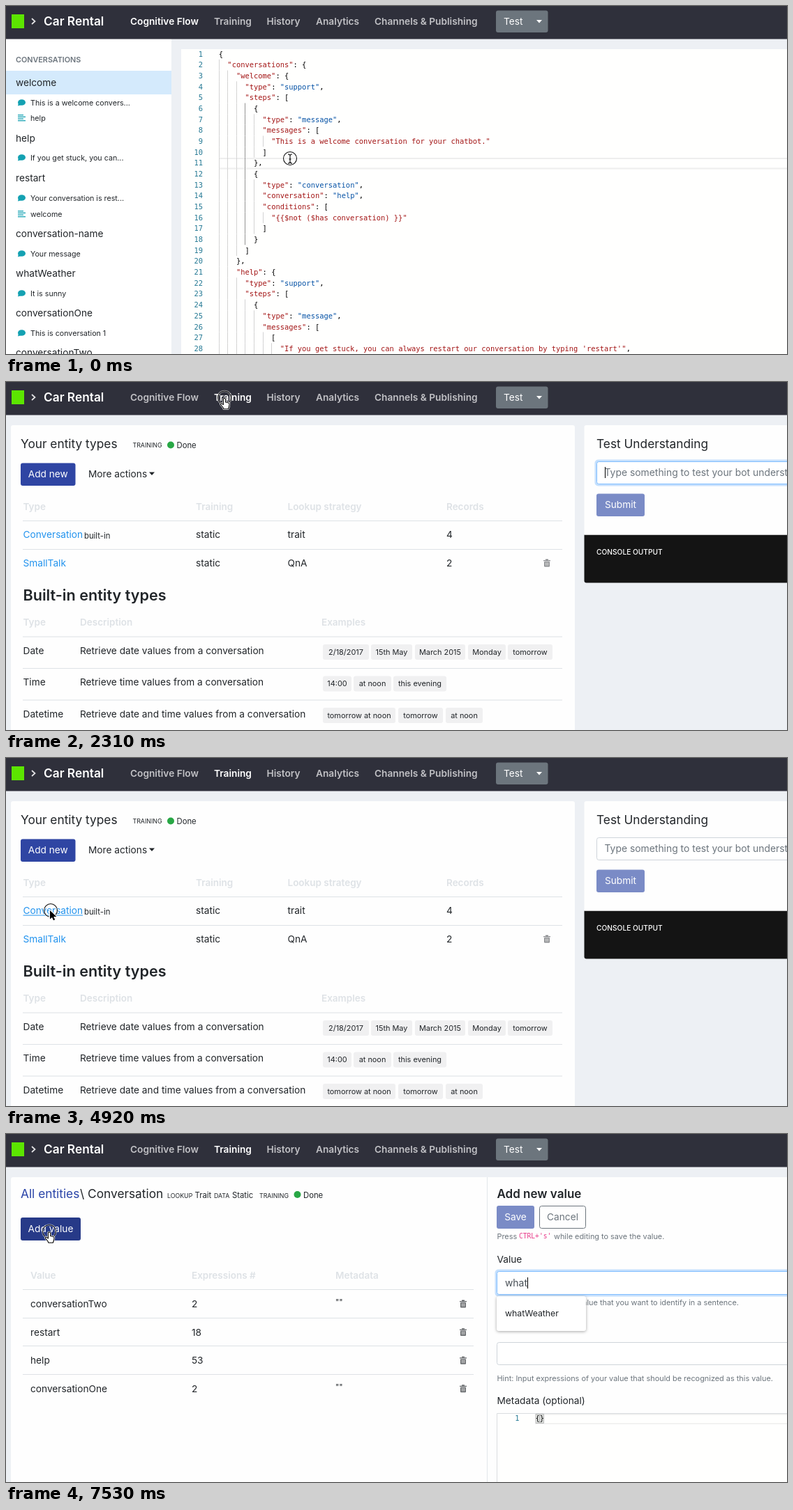
Write an HTML page with a canvas that moves like this. It is 1119 by 500 pixels and loops after 8 s.

```html
<!DOCTYPE html>
<html lang="en">
<head>
<meta charset="utf-8">
<title>Bot training console</title>
<style>
html, body { margin: 0; width: 1119px; height: 500px; overflow: hidden; background: #edf0f4; }
canvas { display: block; }
</style>
</head>
<body>
<canvas id="stage" width="1119" height="500"></canvas>
<script>
const g = document.getElementById('stage').getContext('2d');
const LOOP = 8000;
const SANS = 'Inter, Roboto, sans-serif';
const MONO = '"DejaVu Sans Mono", monospace';
const INK = '#212529', MUTED = '#6c757d', FAINT = '#dee2e6', BLUE = '#2f45a3', DARK_BLUE = '#273a88';
const PALE_BLUE = '#7a8bc6', LINK = '#2293ee', TEAL = '#14a1b2', GREEN = '#28a745', WHITE = '#fefefe';

// Times of the page and panel changes
const TRAINING = 2310, BLUR = 4490, LOADING = 4920, ENTITY = 5010, PRESS = 6200, FORM = 6290;

// cy is the middle of the capital letters
function text(s, x, cy, o = {}) {
  const size = o.size || 13.7;
  g.font = `${o.weight || 400} ${size}px ${o.font || SANS}`;
  g.textAlign = o.align || 'left';
  g.fillStyle = o.color || INK;
  g.fillText(s, x, cy + size * 0.36);
}

function box(x, y, w, h, fill, r = 0, stroke) {
  g.beginPath();
  g.roundRect(x, y, w, h, r);
  if (fill) { g.fillStyle = fill; g.fill(); }
  if (stroke) { g.strokeStyle = stroke; g.lineWidth = 1; g.stroke(); }
}

function disc(x, y, r, fill) {
  g.beginPath();
  g.arc(x, y, r, 0, 7);
  g.fillStyle = fill;
  g.fill();
}

function rule(x1, x2, y) { box(x1, y, x2 - x1, 1, FAINT); }

function triangle(x, y, color) {
  g.fillStyle = color;
  g.beginPath();
  g.moveTo(x - 4, y - 2);
  g.lineTo(x + 4, y - 2);
  g.lineTo(x, y + 2.5);
  g.fill();
}

function button(label, x, y, w, h, fill) {
  box(x, y, w, h, fill, 3);
  text(label, x + w / 2, y + h / 2 - 0.5, { color: '#fff', align: 'center' });
}

function trash(x, y, color) {
  box(x - 5, y - 4, 10, 1.3, color);
  box(x - 2, y - 5.5, 4, 1.5, color);
  box(x - 4, y - 2, 8, 7.5, color, 1);
  for (const dx of [-2.3, -0.4, 1.5]) box(x + dx, y - 1, 0.9, 5, '#e4e4e4');
}

function field(x, y, h, focused) {
  if (focused) box(x - 2.5, y - 2.5, 500, h + 5, '#c5e0fd', 5);
  box(x + 0.5, y + 0.5, 500, h - 1, '#fff', 3, focused ? '#80bdff' : '#ced4da');
}

function header(t) {
  box(0, 0, 1119, 47.6, '#2f303b');
  box(8, 12, 18, 20, '#5ce500');
  g.strokeStyle = '#e4e4e6';
  g.lineWidth = 1.7;
  g.beginPath();
  g.moveTo(37, 18);
  g.lineTo(41.5, 22);
  g.lineTo(37, 26);
  g.stroke();
  text('Car Rental', 54, 22, { size: 17.3, weight: 600, color: '#fff' });
  const active = t < TRAINING ? 0 : 1;
  const hover = t > 1750 && t < TRAINING ? 1 : active;
  [['Cognitive Flow', 178], ['Training', 298], ['History', 373.5], ['Analytics', 444], ['Channels & Publishing', 528]]
    .forEach(([s, x], i) => text(s, x, 22, {
      size: 13.7, weight: 600, color: i === active || i === hover ? '#fff' : '#c1c1c5'
    }));
  box(702, 6.5, 74.5, 31.5, '#6c757d', 3);
  text('Test', 713, 22, { color: '#fff' });
  triangle(764, 22, '#fff');
}

// Rows: kind (h = heading, m = message, l = link), label, y
const TREE = [
  ['h', 'welcome', 110], ['m', 'This is a welcome convers...', 139], ['l', 'help', 161],
  ['h', 'help', 190], ['m', 'If you get stuck, you can...', 218],
  ['h', 'restart', 247], ['m', 'Your conversation is rest...', 276], ['l', 'welcome', 299],
  ['h', 'conversation-name', 327], ['m', 'Your message', 356],
  ['h', 'whatWeather', 384], ['m', 'It is sunny', 413],
  ['h', 'conversationOne', 441], ['m', 'This is conversation 1', 470],
  ['h', 'conversationTwo', 498]
];

function bubble(x, y) {
  g.fillStyle = TEAL;
  g.beginPath();
  g.ellipse(x, y - 0.5, 5.5, 4.3, 0, 0, 7);
  g.fill();
  g.beginPath();
  g.moveTo(x - 4.5, y);
  g.lineTo(x - 5.5, y + 4.6);
  g.lineTo(x, y + 3);
  g.fill();
}

function sidebar() {
  box(0, 47, 237, 453, '#fff');
  text('CONVERSATIONS', 14, 77, { size: 10.8, weight: 600, color: MUTED });
  box(0, 93, 237, 34, '#d4eafc');
  for (const [kind, label, y] of TREE) {
    if (kind === 'h') { text(label, 14, y); continue; }
    text(label, 35, y, { size: 10.7 });
    if (kind === 'm') bubble(22.5, y);
    else [8, 11, 8, 11].forEach((w, i) => box(17, y - 5 + i * 2.7, w, 1.3, TEAL));
  }
}

const CODE = `{
  "conversations": {
    "welcome": {
      "type": "support",
      "steps": [
        {
          "type": "message",
          "messages": [
            "This is a welcome conversation for your chatbot."
          ]
        },
        {
          "type": "conversation",
          "conversation": "help",
          "conditions": [
            "{{$not ($has conversation) }}"
          ]
        }
      ]
    },
    "help": {
      "type": "support",
      "steps": [
        {
          "type": "message",
          "messages": [
            [
              "If you get stuck, you can always restart our conversation by typing 'restart'",`.split('\n');

const CHAR = 6.28, LINE = 15.67, LEFT = 304.8;

function codeLine(s, cy) {
  let col = 0;
  for (const part of s.split(/("[^"]*")/)) {
    const value = s.slice(0, col).endsWith(': ');
    const color = part[0] !== '"' ? '#000' : value ? '#0451a5' : '#a31515';
    text(part, LEFT + col * CHAR, cy, { size: 10.43, font: MONO, color });
    col += part.length;
  }
}

function editor(t) {
  box(251, 62, 868, 438, '#fffffe');
  box(305, 218, 814, 2, '#eeeeee');
  box(305, 232.5, 814, 2, '#eeeeee');
  CODE.forEach((s, i) => {
    const cy = 69 + i * LINE;
    const depth = s.search(/\S/) / 2;
    for (let d = 0; d < depth; d++) {
      const lit = d === 3 && i > 4 && i < 18;
      box(Math.round(LEFT + d * 2 * CHAR), cy - LINE / 2, 1, LINE, lit ? '#939393' : '#d3d3d3');
    }
    text(i + 1, 282, cy, { size: 10.43, font: MONO, color: '#237893', align: 'right' });
    codeLine(s, cy);
  });
  if ((t + 600) % 1000 < 500) box(368, 219, 1.5, 15, '#000');
}

function heads(list, y) {
  for (const [s, x] of list) text(s, x, y, { size: 13.5, weight: 600, color: FAINT });
}

function chips(y, list) {
  for (const [s, x1, x2] of list) {
    box(x1, y - 11, x2 - x1, 22, '#f0f0f1', 3);
    text(s, (x1 + x2) / 2, y, { size: 10.9, align: 'center' });
  }
}

function trainingPage(t) {
  box(7, 62, 808, 445, WHITE, 3);
  text('Your entity types', 21, 89, { size: 17.3 });
  text('TRAINING', 181.5, 91, { size: 8.8 });
  disc(236, 90.5, 5, GREEN);
  text('Done', 244.5, 91, { size: 11.3 });
  const over = t > 3600 && t < 4050;
  button('Add new', 21, 116.5, 78.5, 32.5, over ? '#2a3e96' : BLUE);
  text('More actions', 118, 132.5);
  triangle(209, 131.5, INK);

  heads([['Type', 24.5], ['Training', 272], ['Lookup strategy', 403.5], ['Records', 631]], 179);
  rule(24, 797, 199);
  rule(24, 797, 240);
  text('Conversation', 24.5, 219.5, { color: LINK });
  if (t > 4400) box(24.5, 225.5, 85.5, 1, LINK);
  text('built-in', 112, 220.5, { size: 11.3 });
  text('SmallTalk', 24.5, 260, { color: LINK });
  [['static', 'trait', '4', 219.5], ['static', 'QnA', '2', 260]].forEach(([a, b, c, y]) => {
    text(a, 272, y);
    text(b, 403.5, y);
    text(c, 631, y);
  });
  trash(775, 260, '#8c8e91');

  text('Built-in entity types', 24.5, 306.5, { size: 21.6, weight: 600 });
  heads([['Type', 24.5], ['Description', 106], ['Examples', 452]], 345);
  [['Date', 'date', 386], ['Time', 'time', 431.5], ['Datetime', 'date and time', 477]].forEach(([name, what, y]) => {
    rule(24, 797, y - 20.5);
    text(name, 24.5, y);
    text(`Retrieve ${what} values from a conversation`, 106, y);
  });
  chips(388, [['2/18/2017', 454, 520], ['15th May', 523, 582], ['March 2015', 586, 658], ['Monday', 662, 716], ['tomorrow', 719, 783]]);
  chips(433.5, [['14:00', 454, 495], ['at noon', 498, 552], ['this evening', 555, 631]]);
  chips(479, [['tomorrow at noon', 454, 558], ['tomorrow', 562, 626], ['at noon', 630, 683]]);

  const focused = t < BLUR;
  box(828.5, 219.5, 300, 69, '#141414', [0, 0, 0, 3]);
  box(828.5, 62, 300, 157.5, WHITE, [3, 0, 0, 0]);
  text('Test Understanding', 846, 89, { size: 17.3 });
  field(846, 114, 33, focused);
  text('Type something to test your bot understanding', 857.5, 130, { size: 13.9, color: MUTED });
  if (focused && (t - 2200) % 1000 < 500) box(858, 122, 1, 16, '#000');
  button('Submit', 846, 160.5, 69, 32.5, PALE_BLUE);
  text('CONSOLE OUTPUT', 846, 244.5, { size: 10.2, weight: 500, color: '#fff' });
}

function entityPage(t) {
  box(7, 62, 1119, 445, WHITE, 3);
  box(689, 62, 1, 438, '#e3e7eb');
  text('All entities', 21, 86, { size: 17.3, color: '#2a44a8' });
  text('\\ Conversation', 106, 86, { size: 17.3 });
  [['LOOKUP', 231], ['DATA', 298], ['TRAINING', 363]].forEach(([s, x]) => text(s, x, 88.5, { size: 8.8 }));
  [['Trait', 270.5], ['Static', 324], ['Done', 426]].forEach(([s, x]) => text(s, x, 88, { size: 11.3 }));
  disc(417.5, 87, 5, GREEN);

  if (t >= PRESS && t < 6490) box(19.5, 118.5, 89, 36, '#c8cfe8', 4);
  button('Add value', 21, 120, 86, 33, t > 5850 ? DARK_BLUE : BLUE);

  heads([['Value', 35], ['Expressions #', 266], ['Metadata', 472]], 203);
  [['conversationTwo', 2, '""'], ['restart', 18, ''], ['help', 53, ''], ['conversationOne', 2, '""']].forEach(([s, n, meta], i) => {
    const y = 244 + i * 40.6;
    rule(24, 670, Math.round(y - 21));
    text(s, 35, y);
    text(n, 266, y);
    text(meta, 472, y - 2, { size: 11.3 });
    trash(655, y, '#66696c');
  });

  if (t >= FORM) return form(t);
  text('4 items', 711, 95.5, { size: 21.2, weight: 600 });
  text('Select an item to view details.', 711, 124);
}

function form(t) {
  const hint = { size: 10.9, color: MUTED };
  text('Add new value', 703.5, 86, { size: 17, weight: 600 });
  button('Save', 703, 103, 54, 33, PALE_BLUE);
  box(764.5, 103.5, 66, 32, null, 3, MUTED);
  text('Cancel', 797.5, 119, { color: MUTED, align: 'center' });
  text('Press', 703.5, 147, hint);
  text("CTRL+'s'", 735, 147, { size: 9.6, font: MONO, color: '#e83e8c' });
  text('while editing to save the value.', 785, 147, hint);

  text('Value', 703.5, 180);
  text('Hint: Input the unique value that you want to identify in a sentence.', 1050, 242, { ...hint, align: 'right' });
  text('Expressions', 703.5, 272);
  field(703, 299, 33, false);
  text('Hint: Input expressions of your value that should be recognized as this value.', 703.5, 351, hint);
  text('Metadata (optional)', 703.5, 383);

  box(703.5, 401.5, 500, 120, '#fffffe', 0, '#dadde0');
  box(758, 402, 361, 1.5, '#eeeeee');
  box(758, 415.5, 361, 1.5, '#eeeeee');
  for (const i of [0, 1]) box(759 + i * 6, 402.5, 5.5, 13, '#e2e5e2', 0, '#b9b9b9');
  text('1', 732.5, 408.5, { size: 10.43, font: MONO, color: '#237893', align: 'center' });
  text('{}', 758.5, 408.5, { size: 10.43, font: MONO, color: '#000' });

  // Typing and its suggestions
  const typed = 'what'.slice(0, [7210, 7360, 7445, 7530].filter(at => t >= at).length);
  field(703, 197, 34, true);
  text(typed, 715, 214, { size: 13.9, color: '#495057' });
  const width = g.measureText(typed).width;
  if (typed || t < 6850) box(Math.round(715 + width), 206, 1, 16, '#000');
  if (!typed) return;
  const words = ['welcome', 'whatWeather'].filter(w => w.startsWith(typed));
  g.save();
  g.shadowColor = 'rgba(0,0,0,.35)';
  g.shadowBlur = 4;
  g.shadowOffsetY = 1;
  box(703, 233, 128, 13 + 37 * words.length, '#fff', 3);
  g.restore();
  words.forEach((w, i) => text(w, 715, 258 + i * 37, { size: 12.3 }));
}

const HAND = new Path2D('M-1.6 2.5a1.6 1.6 0 0 1 3.2 0v4l3.6 .7q2 .4 1.8 2.4l-.5 3.4-1.2 3.2h-6.4l-1-2.2-3.6-4.4q0-1.7 1.8-1.2l2.3 1.6z');
const ARROW = new Path2D('M-1 0v12.6l3-2.7 2 4.4 2.2-1-2-4.3h4.2z');
const BEAM = new Path2D('M-3 -6q3 0 3 2q0 -2 3 -2M0 -4v9M-3 7q3 0 3 -2q0 2 3 2M-1.5 1h3');

const PATH = [
  [0, 407, 219], [900, 407, 219], [1900, 313, 22.5], [3130, 313, 22.5], [3720, 91.5, 148],
  [3930, 91, 149], [4570, 64, 219], [5600, 64, 219], [6030, 62, 140], [LOOP, 62, 140]
];

function pointer(t) {
  const i = PATH.findIndex(p => p[0] > t);
  const [t0, x0, y0] = PATH[i - 1], [t1, x1, y1] = PATH[i];
  const u = (t - t0) / (t1 - t0), k = u * u * (3 - 2 * u);
  return [x0 + (x1 - x0) * k, y0 + (y1 - y0) * k];
}

function shape(t, x, y) {
  if (t < TRAINING && y > 62) return BEAM;
  if (y < 36) return x > 296 && x < 354 ? HAND : ARROW;
  if (t >= ENTITY) return y < 153 ? HAND : ARROW;
  if (t >= LOADING) return ARROW;
  const onButton = x < 100 && y > 116 && y < 151;
  const onLink = x < 110 && y > 209;
  return onButton || onLink ? HAND : ARROW;
}

function cursor(t) {
  const [x, y] = pointer(t);
  const path = shape(t, x, y);
  g.save();
  g.translate(x, y);
  g.lineJoin = 'round';
  g.beginPath();
  g.arc(0, 0, 9.5, 0, 7);
  g.strokeStyle = 'rgba(255,255,255,.55)';
  g.lineWidth = 2.6;
  g.stroke();
  g.strokeStyle = '#111';
  g.lineWidth = 1.1;
  g.stroke();
  if (path !== BEAM) {
    g.strokeStyle = '#fff';
    g.lineWidth = 2.4;
    g.stroke(path);
    g.fillStyle = path === HAND ? '#fff' : '#000';
    g.fill(path);
  }
  if (path !== ARROW) {
    g.strokeStyle = '#000';
    g.lineWidth = 1.1;
    g.stroke(path);
  }
  g.restore();
}

function draw(now) {
  const t = now % LOOP;
  box(0, 0, 1119, 500, '#edf0f4');
  if (t < TRAINING) {
    sidebar();
    editor(t);
  } else if (t < ENTITY) trainingPage(t);
  else entityPage(t);
  header(t);
  cursor(t);
}

const start = performance.now();
function tick() {
  draw(performance.now() - start);
  requestAnimationFrame(tick);
}
tick();
</script>
</body>
</html>
```
